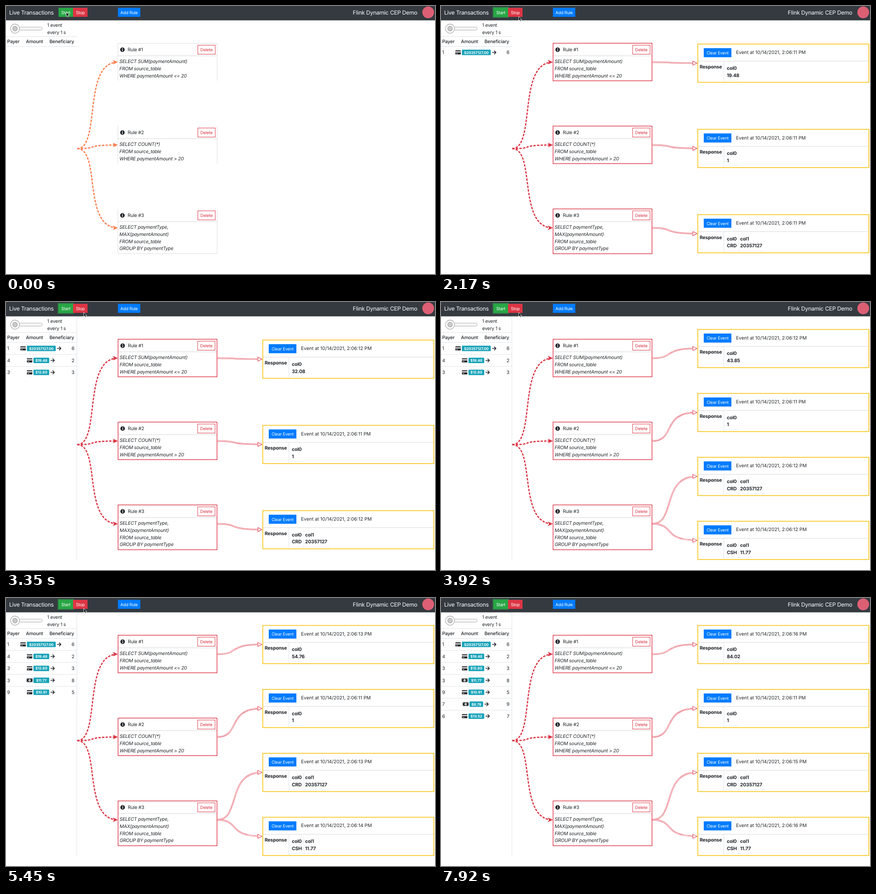
Recreate the animation shown at these times as an HTML page. Size 947 px wide and 592 px high, loop 8000 ms.

```html
<!DOCTYPE html>
<html lang="en">
<head>
<meta charset="utf-8">
<title>Live Transactions</title>
<style>
  html, body { margin: 0; width: 100%; height: 100%; overflow: hidden; background: #fff; }
  svg { display: block; width: 947px; height: 592px; }
  text { font-family: Inter, "Liberation Sans", sans-serif; white-space: pre; text-rendering: geometricPrecision; }
</style>
</head>
<body>
<svg id="stage" viewBox="0 0 947 592"></svg>
<script>
const LOOP = 8000;
const INK = '#212529', GRAY = '#dee2e6', RED = '#dc3545', BLUE = '#007bff', CORAL = '#ff7f50', GOLD = '#f8c51c';
const PRESS = 260, RELEASE = 1570, CURSOR_OUT = 7480;

// payer, amount, type, beneficiary, time of the alerts, time of the sum when later
const transactions = [
  [1, 20357127, 'CRD', 6, 1710],
  [4, 19.48, 'CRD', 2, 1710],
  [3, 12.60, 'CRD', 3, 2700],
  [3, 11.77, 'CSH', 8, 3490],
  [9, 10.91, 'CRD', 5, 4490],
  [7, 8.79, 'CSH', 9, 5440, 5590],
  [6, 13.52, 'CRD', 7, 6480],
  [2, 6.95, 'CSH', 4, 7480],
].map(([payer, amount, type, to, alertAt, sumAt = alertAt], i) =>
  ({ payer, amount, type, to, alertAt, sumAt, listedAt: 1250 + 1000 * i }));

const rules = [
  { top: 82.5, height: 82.5, sql: ['SELECT SUM(paymentAmount)', 'FROM source_table', 'WHERE paymentAmount &lt;= 20'] },
  { top: 265.5, height: 82.5, sql: ['SELECT COUNT(*)', 'FROM source_table', 'WHERE paymentAmount &gt; 20'] },
  { top: 448.5, height: 98.5, sql: ['SELECT paymentType,', 'MAX(paymentAmount)', 'FROM source_table', 'GROUP BY paymentType'] },
];

const rect = (x, y, w, h, fill, extra = '') =>
  `<rect x="${x}" y="${y}" width="${w}" height="${h}" fill="${fill}" ${extra}/>`;
const path = (d, stroke, width = 1, fill = 'none', extra = '') =>
  `<path d="${d}" stroke="${stroke}" stroke-width="${width}" fill="${fill}" ${extra}/>`;
const circle = (x, y, r, fill, extra = '') => `<circle cx="${x}" cy="${y}" r="${r}" fill="${fill}" ${extra}/>`;
// y is the middle of the capitals
const text = (x, y, content, { size = 10.4, fill = INK, weight = 400, anchor = 'start', style = 'normal', tracking = -.02 } = {}) =>
  `<text x="${x}" y="${y + size * .364}" font-size="${size}" fill="${fill}" font-weight="${weight}" text-anchor="${anchor}" font-style="${style}" letter-spacing="${tracking}em">${content}</text>`;
const button = (x, y, w, label, fill) =>
  rect(x, y, w, 20, fill) + text(x + w / 2, y + 10.3, label, { size: 9.35, fill: '#fff', anchor: 'middle' });

// Connector whose end pulls harder than its start; it stops inside the arrowhead.
function connector(x1, y1, x2, y2) {
  const cut = .965, mix = (a, b) => a.map((v, k) => v + (b[k] - v) * cut);
  let points = [[x1, y1], [x1 + 53, y1], [x2 - 79, y2], [x2, y2]];
  const kept = [points[0]];
  while (points.length > 1) {
    points = points.slice(1).map((p, k) => mix(points[k], p));
    kept.push(points[0]);
  }
  return `M${kept[0]}C${kept.slice(1).join(' ')}`;
}

function navbar(t) {
  const pressed = t >= PRESS && t < RELEASE;
  return rect(0, 0, 947, 31.7, '#343a40')
    + text(7, 14, 'Live Transactions', { size: 12.4, fill: '#fff' })
    + (t >= PRESS ? rect(114, 2, 36, 24, pressed ? '#25833a' : '#2f7a44') : '')
    + button(116, 4, 32, 'Start', pressed ? '#218838' : '#28a745')
    + button(148, 4, 32, 'Stop', RED)
    + button(247, 4, 49.5, 'Add Rule', BLUE)
    + text(908, 14, 'Flink Dynamic CEP Demo', { size: 12.4, fill: '#fff', anchor: 'end' })
    + circle(932, 14, 13, '#dc5f74');
}

function typeIcon(type, x, y) {
  return type === 'CRD'
    ? rect(x, y - 4.5, 12, 9, INK, 'rx="1"') + rect(x, y - 2.3, 12, 2.2, '#fff') + rect(x + 1.5, y + 2, 4, 1, '#fff')
    : rect(x - .5, y - 4, 13, 8, INK, 'rx="1"')
      + `<ellipse cx="${x + 6}" cy="${y}" rx="2.3" ry="2.8" fill="#fff"/>` + rect(x + 5.5, y - 1.5, 1, 3, INK)
      + [x + .5, x + 10.5].map(cx => rect(cx, y - 3, 1, 1, '#fff') + rect(cx, y + 2, 1, 1, '#fff')).join('');
}

function transactionRow({ payer, amount, type, to }, i) {
  const y = 102.6 + 26.4 * i, label = '$' + amount.toFixed(2);
  const w = 6 + 4.8 * label.length, left = 78 - w / 2, tip = 78 + w / 2 + 12;
  return (i ? path(`M0,${y - 13.2}H157`, GRAY) : '')
    + text(2.5, y, payer) + text(151, y, to, { anchor: 'end' })
    + typeIcon(type, left - 14.5, y)
    + rect(left, y - 6, w, 12, '#17a2b8', 'rx="1.5"')
    + text(78, y, label, { size: 8, fill: '#fff', weight: 700, anchor: 'middle' })
    + path(`M${tip - 9},${y}H${tip - .5}M${tip - 4.5},${y - 4}l4,4l-4,4`, INK, 1.5);
}

function sidebar(t) {
  const edge = t < PRESS ? 32 : t < RELEASE ? 499 : t < 2700 ? 32 : 570;
  return rect(28, 46.5, 52, 7, '#f4f4f4', 'rx="3.5" stroke="#b5b5b5"')
    + circle(20, 50, 10, '#fff', 'stroke="#b0b0b0" stroke-width="1.3"')
    + circle(20, 50, 5.2, '#ccc', 'stroke="#8c8c8c"')
    + text(91, 42.5, '1 event') + text(91, 58.5, 'every 1 s')
    + path('M0,67.5H157M0,89.5H157', GRAY) + path(`M156.5,32V${edge}`, GRAY)
    + text(2.5, 78.5, 'Payer', { weight: 500 }) + text(44, 78.5, 'Amount', { weight: 500 })
    + text(96, 78.5, 'Beneficiary', { weight: 500 })
    + transactions.filter(tx => t >= tx.listedAt).map(transactionRow).join('');
}

function ruleCard({ top, height, sql }, i, alerted, t) {
  const bottom = top + height, shift = alerted ? .5 : 0, line = alerted ? RED : CORAL;
  const y = top + 41.5;
  // idle cards show some of their horizontal edges only in part
  const partial = t < PRESS ? 247 : 299;
  const frame = alerted
    ? rect(247.4, top - .2, 218.3, height + .5, 'none', `stroke="${RED}" stroke-width="1.4"`)
    : path(`M247,${top}V${bottom}M466,${top}V${bottom}M247,${top}H${i ? partial : 466}M247,${bottom}H${i < 2 ? partial : 466}`, '#dcdcdc');
  return path(`M247,${top + 27.5}H466`, '#d4d4d4') + frame
    + circle(257 + shift, top + 14, 5, INK) + rect(256.3 + shift, top + 13.3, 1.6, 3.6, '#fff')
    + circle(257.1 + shift, top + 11.5, .9, '#fff')
    + text(268.5 + shift, top + 14.2, `Rule #${i + 1}`)
    + rect(423.5 - shift, top + 4, 38.5, 20, '#fff', `stroke="${RED}"`)
    + text(442.7 - shift, top + 14.3, 'Delete', { size: 9.35, fill: RED, anchor: 'middle' })
    + sql.map((s, k) => text(250.3 + shift, top + 39.8 + 15.8 * k, s, { style: 'italic' })).join('')
    + path(connector(157, 315, 247, y), line, 2.65, 'none', 'stroke-dasharray="5.3 2.65"')
    + path(`M247,${y}l-11,-5l2.5,5l-2.5,5z`, 'none', 0, line);
}

const clock = t => `2:06:${Math.floor(9.4 + t / 1000)} PM`;

// Boxes in order of rule; within a rule the latest update comes last.
function alertsAt(t) {
  let sum = null, count = null, sumTotal = 0, maxima = [];
  for (const { amount, type, alertAt, sumAt } of transactions) {
    if (amount <= 20) {
      sumTotal += amount;
      if (t >= sumAt) sum = { rule: 0, at: sumAt, values: [sumTotal.toFixed(2)] };
    }
    if (t < alertAt) continue;
    if (amount > 20) count = { rule: 1, at: alertAt, values: ['1'] };
    const known = maxima.find(m => m.values[0] === type);
    const max = Math.max(amount, known ? known.values[1] : 0);
    maxima = [...maxima.filter(m => m !== known), { rule: 2, at: alertAt, values: [type, max] }];
  }
  return [sum, count, ...maxima].filter(Boolean);
}

function alertBox({ rule, at, values }, i, all) {
  const y = 32 + 565 / all.length * (i + .5), top = y - 42;
  const link = connector(466, rules[rule].top + 41.5, 565, y);
  const end = values.length < 2 ? 656 : String(values[1]).length > 5 ? 714 : 690;
  const bold = { weight: 700, size: 10.5 };
  return path(link, RED, 2.8) + path(link, '#fff', 1.3)
    + path(`M556,${y - 4.5}L565,${y}L556,${y + 4.5}Z`, RED, 1.1, '#fff')
    + path(`M567,${top + 37.5}H944`, '#d8d8d8')
    + path(`M624.5,${top + 38}V${top + 83}`, GRAY)
    + path(`M628,${top + 80}H${end}` + (values.length > 1 ? `M657.5,${top + 42}V${top + 80}` : ''), '#ececec')
    + rect(566.8, top, 377.6, 84.4, 'none', `stroke="${GOLD}" stroke-width="1.7"`)
    + button(580, top + 9, 61, 'Clear Event', BLUE)
    + text(651.3, top + 18.3, `Event at 10/14/2021, ${clock(at)}`, { tracking: 0 })
    + text(571, top + 50, 'Response', bold)
    + values.map((v, k) => text(631 + 29.3 * k, top + 52.9, `col${k}`, bold)
      + text(631 + 29.3 * k, top + 68.8, v, bold)).join('');
}

function cursor(t) {
  if (t >= CURSOR_OUT) return '';
  const p = Math.min(1, Math.max(0, (t - RELEASE) / 420)), ease = p * p * (3 - 2 * p);
  const shape = t >= PRESS && t < RELEASE
    ? path('M1,0.5q1,-.8 1.6,.3v3.4l3.8,1.2v3.3l-1.3,2.8h-3.6l-3,-4.2q.4,-1.3 1.9,0z', '#111', .9, '#fff')
    : path('M0,0V9.5l2.2,-2l1.5,3.4l1.7,-.8l-1.5,-3.2h2.9z', '#fff', .8, '#111');
  return `<g transform="translate(${133 + 38.5 * ease},${13.5 + 9.5 * ease})">${shape}</g>`;
}

function render(t) {
  const alerts = alertsAt(t);
  return navbar(t) + sidebar(t)
    + rules.map((r, i) => ruleCard(r, i, alerts.some(a => a.rule === i), t)).join('')
    + alerts.map(alertBox).join('') + cursor(t);
}

const stage = document.getElementById('stage');
let shown = '';
function tick() {
  const markup = render(performance.now() % LOOP);
  if (markup !== shown) stage.innerHTML = shown = markup;
  requestAnimationFrame(tick);
}
tick();
</script>
</body>
</html>
```
